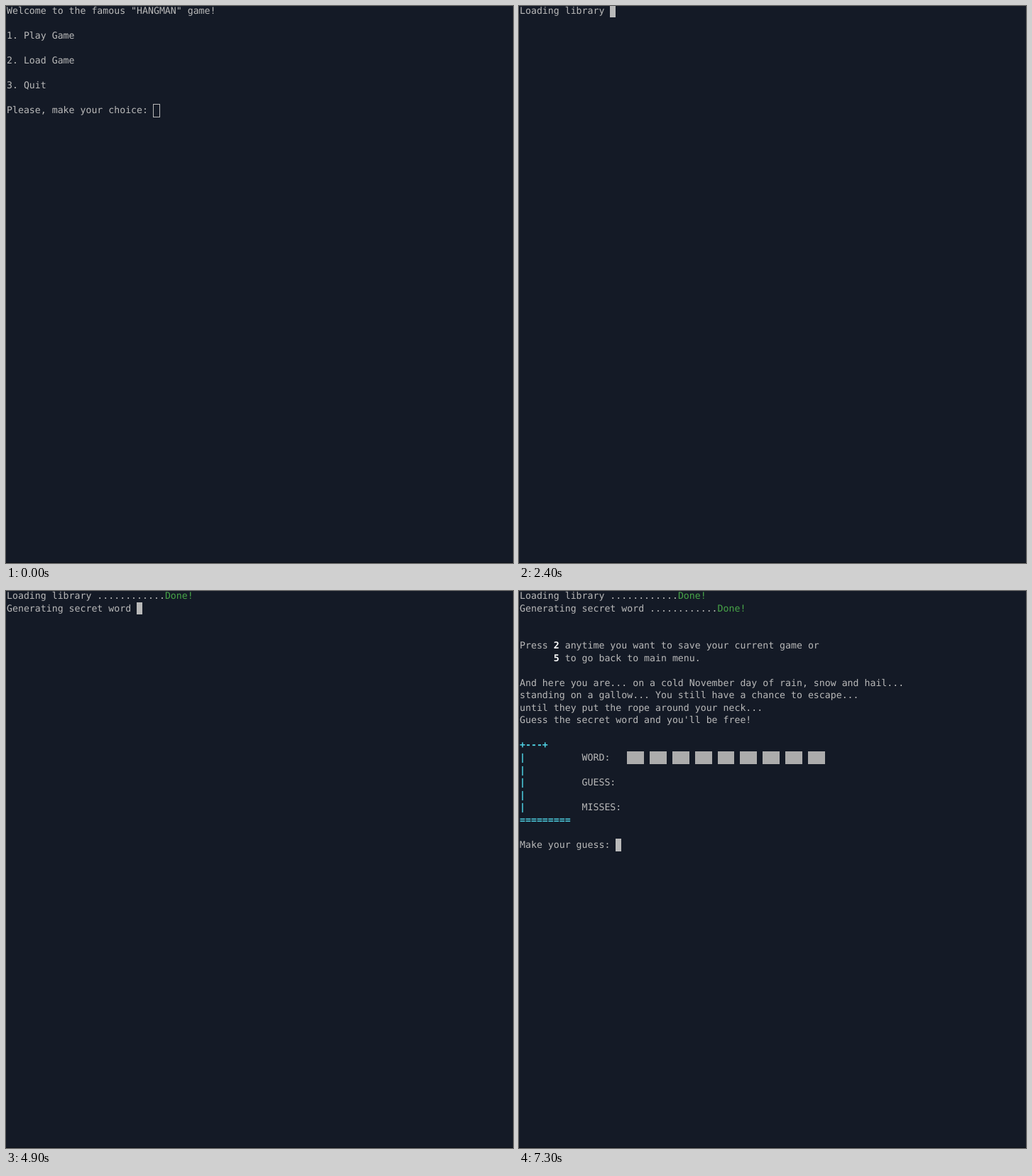
An HTML page that plays this animation: 714 by 785 pixels, repeating every 8000 ms.

```html
<!DOCTYPE html>
<html lang="en">
<head>
<meta charset="utf-8">
<title>Hangman terminal</title>
<style>
  html, body { margin: 0; width: 100%; height: 100%; overflow: hidden; background: #141a26; }
  #term {
    position: relative; width: 714px; height: 785px; overflow: hidden;
    background: #141a26; color: #b9b9b9;
    font: 13.22px/15px "DejaVu Sans Mono", monospace;
    text-rendering: geometricPrecision; font-kerning: none; font-variant-ligatures: none;
  }
  #term::after { content: ""; position: absolute; left: 0; top: 784px; width: 714px; height: 1px; background: #0c1018; }
  #term span, #term i { position: absolute; white-space: pre; }
  .green { color: #48a548; }
  .cyan { color: #4fd2e4; font-weight: bold; }
  .white { color: #fff; font-weight: bold; }
  .block { background: #acacac; }
  .cursor { background: #b9b9b9; }
  .hollow { box-sizing: border-box; border: 1px solid #b9b9b9; }
</style>
</head>
<body>
<div id="term"></div>
<script>
const LOOP = 8000, CELL_W = 7.96, CELL_H = 17.53, LEFT = 1;
const TEXT_TOP = 0.1, BOX_TOP = -1.6;
const term = document.getElementById('term');
const colX = col => LEFT + col * CELL_W;
const rowY = (row, top) => Math.round(top + row * CELL_H);

function add(tag, cls, style) {
  const el = document.createElement(tag);
  el.className = cls;
  Object.assign(el.style, style);
  term.append(el);
  return el;
}

function text(row, col, str, cls = '') {
  add('span', cls, { left: colX(col) + 'px', top: rowY(row, TEXT_TOP) + 'px' }).textContent = str;
}

function box(row, col, cols, cls, grow = 0) {
  const x = Math.round(colX(col)) - grow, y = rowY(row, BOX_TOP) - grow;
  const right = Math.round(colX(col + cols)) + grow;
  const bottom = rowY(row + 1, BOX_TOP) + grow;
  add('i', cls, { left: x + 'px', top: y + 'px', width: right - x + 'px', height: bottom - y + 'px' });
}

const cursor = (row, col) => box(row, col, 1, 'cursor');

function menu(typed, focused = true) {
  const prompt = 'Please, make your choice: ' + typed;
  ['Welcome to the famous "HANGMAN" game!', '1. Play Game', '2. Load Game', '3. Quit', prompt]
    .forEach((line, i) => text(i * 2, 0, line));
  if (focused) cursor(8, prompt.length);
  else box(8, prompt.length, 1, 'hollow', 1);
}

function progress(row, label, dots, done) {
  const line = label + ' ' + '.'.repeat(dots);
  text(row, 0, line);
  if (done) text(row, line.length, 'Done!', 'green');
  else cursor(row, line.length);
}

const loading = (dots, done) => progress(0, 'Loading library', dots, done);

function generating(dots, done) {
  loading(12, true);
  progress(1, 'Generating secret word', dots, done);
}

function game() {
  generating(12, true);
  text(4, 0, 'Press');
  text(4, 6, '2', 'white');
  text(4, 8, 'anytime you want to save your current game or');
  text(5, 6, '5', 'white');
  text(5, 8, 'to go back to main menu.');
  [
    'And here you are... on a cold November day of rain, snow and hail...',
    'standing on a gallow... You still have a chance to escape...',
    'until they put the rope around your neck...',
    "Guess the secret word and you'll be free!"
  ].forEach((line, i) => text(7 + i, 0, line));

  text(12, 0, '+---+', 'cyan');
  for (let row = 13; row < 18; row++) text(row, 0, '|', 'cyan');
  text(18, 0, '=========', 'cyan');
  ['WORD:', 'GUESS:', 'MISSES:'].forEach((label, i) => text(13 + i * 2, 11, label));
  for (let i = 0; i < 9; i++) box(13, 19 + i * 4, 3, 'block');

  text(20, 0, 'Make your guess:');
  cursor(20, 17);
}

const steps = [
  [0, () => menu('', false)],
  [1400, () => menu('')],
  [1800, () => menu('1')],
  ...[[2400, 0], [2900, 2], [3200, 4], [3600, 6], [3900, 7], [4200, 9], [4500, 10]]
    .map(([at, dots]) => [at, () => loading(dots)]),
  ...[[4900, 0], [5200, 2], [5600, 4], [5900, 5], [6200, 7], [6500, 8], [6900, 10]]
    .map(([at, dots]) => [at, () => generating(dots)]),
  [7300, game]
];

let shown = -1;
function tick() {
  const t = performance.now() % LOOP;
  const step = steps.filter(([at]) => at <= t).length - 1;
  if (step !== shown) {
    shown = step;
    term.replaceChildren();
    steps[step][1]();
  }
  requestAnimationFrame(tick);
}
tick();
</script>
</body>
</html>
```
